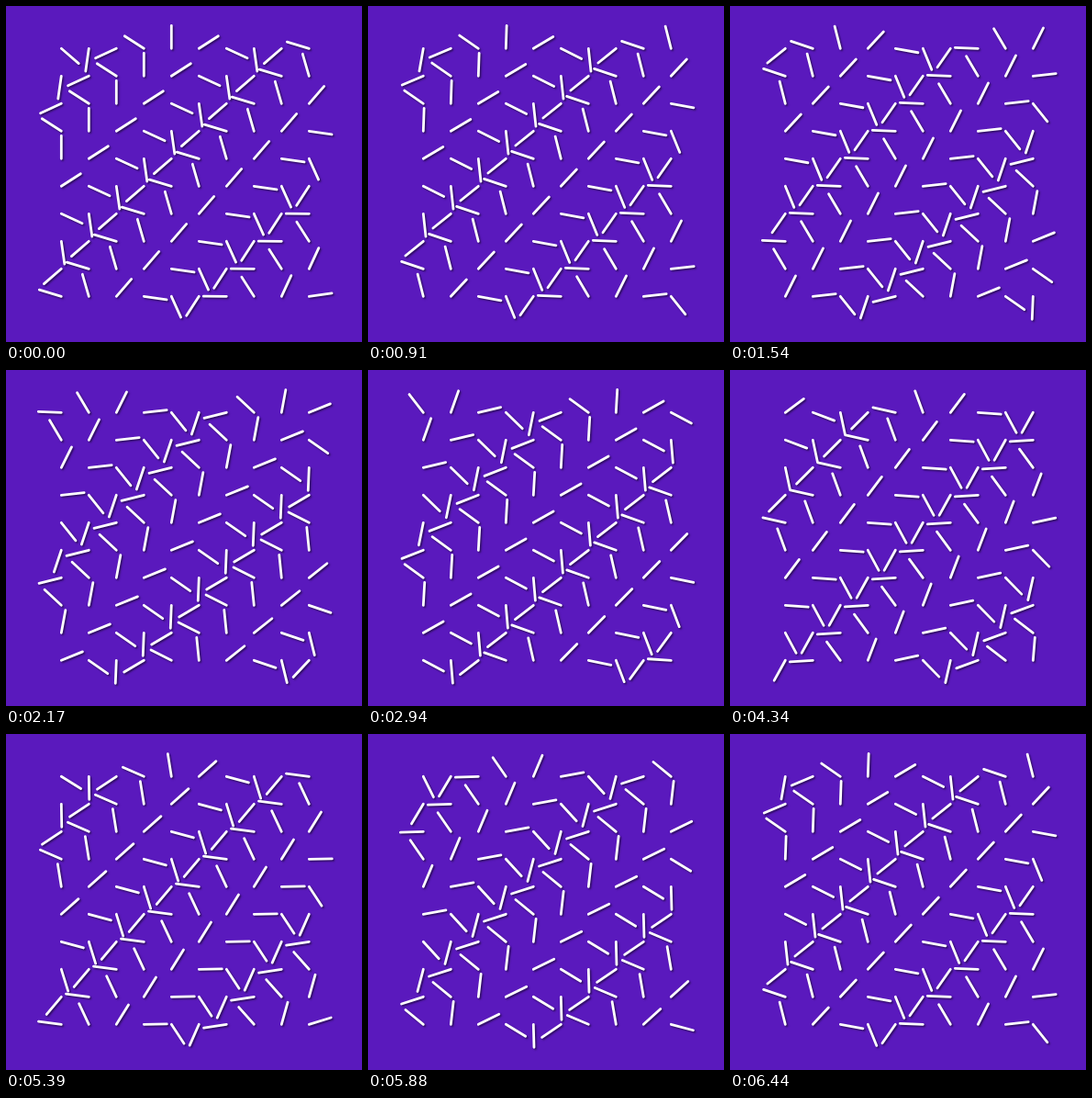
Write an HTML page with a canvas that moves like this. It is 388 by 366 pixels and loops after 6510 ms.

```html
<!DOCTYPE html>
<html lang="en">
<head>
<meta charset="utf-8">
<title>Rotating lines</title>
<style>
  html, body { margin: 0; width: 100%; height: 100%; overflow: hidden; background: #5a19bd; }
  canvas { display: block; }
</style>
</head>
<body>
<canvas id="stage" width="388" height="366"></canvas>
<script>
const ctx = document.getElementById('stage').getContext('2d');
const STEP_MS = 70, STEPS = 93;
const GRID = 10, GAP = 30, LEFT = 60.3, TOP = 46.3, LENGTH = 25;
const START = 1.5 * Math.PI - 4;      // radians
const TURN = 2 * Math.PI / 79;        // radians per step

function draw(step) {
  ctx.shadowColor = 'transparent';
  ctx.fillStyle = '#5a19bd';
  ctx.fillRect(0, 0, 388, 366);

  ctx.strokeStyle = '#fff';
  ctx.lineWidth = 2.8;
  ctx.lineCap = 'round';
  ctx.shadowColor = 'rgba(0, 0, 0, 0.5)';
  ctx.shadowOffsetX = ctx.shadowOffsetY = 1.5;
  ctx.shadowBlur = 2;

  ctx.beginPath();
  for (let row = 0; row < GRID; row++) {
    for (let col = 0; col < GRID; col++) {
      // each diagonal runs one radian ahead of the last
      const angle = START + step * TURN + col + row;
      const x = LEFT + col * GAP, y = TOP + row * GAP;
      ctx.moveTo(x, y);
      ctx.lineTo(x + LENGTH * Math.cos(angle), y + LENGTH * Math.sin(angle));
    }
  }
  ctx.stroke();
}

const begin = performance.now();
let shown = 0;
draw(0);

function tick() {
  const step = Math.floor((performance.now() - begin) / STEP_MS) % STEPS;
  if (step !== shown) draw(shown = step);
  requestAnimationFrame(tick);
}
requestAnimationFrame(tick);
</script>
</body>
</html>
```
